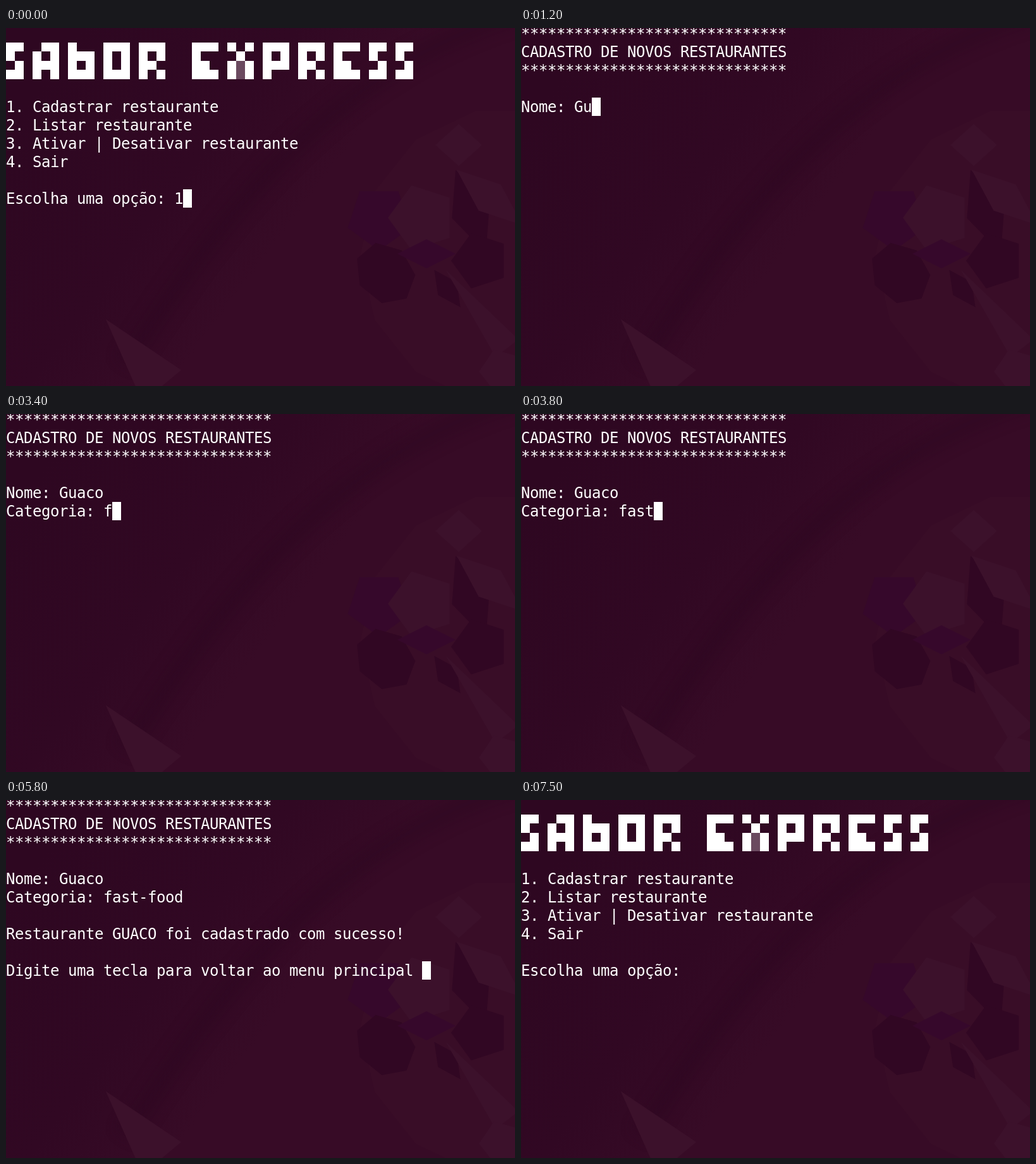
Recreate the animation shown at these times as an HTML page with a canvas. Size 805 by 566 pixels, loop 8000 ms.

```html
<!DOCTYPE html>
<html lang="pt">
<head>
<meta charset="utf-8">
<title>Terminal</title>
<style>
  html, body { margin: 0; width: 100%; height: 100%; overflow: hidden; background: #300822; }
  canvas { display: block; }
</style>
</head>
<body>
<canvas id="stage" width="805" height="566"></canvas>
<script>
const W = 805, H = 566, LOOP = 8000;
const CELL = 14, LINE = 29, TOP = -6, BASE = 23;
const FONT = '24px "DejaVu Sans Mono", monospace';
const LIGHT = '#3c112b', DARK = '#310723', VIOLET = '#36082b';
const ctx = document.getElementById('stage').getContext('2d');

const LOGO = [
  '█▀ ▄▀█ █▄▄ █▀█ █▀█   █▀▀ ▀▄▀ █▀█ █▀█ █▀▀ █▀ █▀',
  '▄█ █▀█ █▄█ █▄█ █▀▄   ██▄ █░█ █▀▀ █▀▄ ██▄ ▄█ ▄█'
];
const MENU = ['1. Cadastrar restaurante', '2. Listar restaurante',
  '3. Ativar | Desativar restaurante', '4. Sair'];

const NAME = 'Guaco', KIND = 'fast-food';
const NAME_KEYS = [900, 1200, 1300, 1400, 1600];
const KIND_KEYS = [3400, 3500, 3600, 3800, 4400, 4700, 4800, 5000, 5100];
const FORM_START = 200, KIND_START = 2300, DONE = 5800, FORM_END = 6900;

// Spans in which the blinking cursor is hidden
const BLINKS = [[2100, 2200], [2800, 3400], [5600, 5700], [6300, 6800], [7500, LOOP]];

function makeWallpaper() {
  const c = document.createElement('canvas');
  c.width = W;
  c.height = H;
  const g = c.getContext('2d');

  // Flattened regular polygon, first corner pointing along the tilt
  function facet(color, x, y, r, sides, tilt = 0, flat = 1) {
    g.save();
    g.translate(x, y);
    g.rotate(tilt * Math.PI / 180);
    g.scale(1, flat);
    g.beginPath();
    for (let i = 0; i < sides; i++) {
      const a = i / sides * 2 * Math.PI;
      g.lineTo(r * Math.cos(a), r * Math.sin(a));
    }
    g.restore();
    g.fillStyle = color;
    g.fill();
  }

  const fade = g.createLinearGradient(60, 80, 540, 440);
  fade.addColorStop(0, '#2e0721');
  fade.addColorStop(0.45, '#310823');
  fade.addColorStop(0.75, '#370b26');
  g.fillStyle = fade;
  g.fillRect(0, 0, W, H);

  // Faint dark sweep across the desktop
  g.filter = 'blur(10px)';
  g.strokeStyle = 'rgba(42,4,30,.28)';
  g.lineWidth = 36;
  g.beginPath();
  g.moveTo(190, 530);
  g.bezierCurveTo(330, 310, 510, 60, 830, -30);
  g.stroke();
  g.filter = 'none';

  facet(LIGHT, 217, 531, 92, 3, 230, 0.5);
  facet('#390d27', 795, 360, 235, 14);
  facet(VIOLET, 590, 300, 52, 5, 90);
  facet(LIGHT, 658, 300, 54, 5, 180);
  facet(DARK, 600, 388, 52, 7, 50, 0.85);
  facet(VIOLET, 665, 357, 46, 4, 0, 0.5);
  facet(LIGHT, 716, 185, 37, 4, 0, 0.9);
  facet(DARK, 735, 290, 70, 4, 70, 0.45);
  facet(LIGHT, 765, 268, 68, 4, 40, 0.4);
  facet(DARK, 750, 368, 46, 5, 180);
  facet(DARK, 698, 412, 36, 4, 55, 0.5);
  facet(LIGHT, 760, 465, 105, 3, 232, 0.25);
  facet(LIGHT, 784, 542, 36, 5, 250);
  return c;
}

const wallpaper = makeWallpaper();
const rowTop = row => TOP + row * LINE;

function write(text, row) {
  ctx.fillStyle = '#fff';
  [...text].forEach((ch, col) => ctx.fillText(ch, col * CELL, rowTop(row) + BASE));
}

function drawLogo() {
  const half = Math.floor(LINE / 2);
  LOGO.forEach((line, i) => {
    [...line].forEach((ch, col) => {
      if (ch === ' ') return;
      const y = rowTop(i + 1) + (ch === '▄' ? half : 0);
      const h = ch === '▀' ? half : ch === '▄' ? LINE - half : LINE;
      ctx.fillStyle = ch === '░' ? '#6b4a60' : '#fff';
      ctx.fillRect(col * CELL, y, CELL, h);
    });
  });
}

const typed = (text, keys, t) => text.slice(0, keys.filter(k => k <= t).length);

// Both screens return the cursor's column and row
function drawMenu(t) {
  drawLogo();
  MENU.forEach((item, i) => write(item, 4 + i));
  const prompt = 'Escolha uma opção: ' + (t < FORM_START ? '1' : '');
  write(prompt, 9);
  return [prompt.length, 9];
}

function drawForm(t) {
  const rule = '*'.repeat(30);
  write(rule, 0);
  write('CADASTRO DE NOVOS RESTAURANTES', 1);
  write(rule, 2);
  let text = 'Nome: ' + typed(NAME, NAME_KEYS, t), row = 4;
  write(text, row);
  if (t >= KIND_START) {
    text = 'Categoria: ' + typed(KIND, KIND_KEYS, t);
    row = 5;
    write(text, row);
  }
  if (t >= DONE) {
    write(`Restaurante ${NAME.toUpperCase()} foi cadastrado com sucesso!`, 7);
    text = 'Digite uma tecla para voltar ao menu principal ';
    row = 9;
    write(text, row);
  }
  return [text.length, row];
}

function frame(now) {
  const t = now % LOOP;
  ctx.drawImage(wallpaper, 0, 0);
  ctx.font = FONT;
  const inForm = t >= FORM_START && t < FORM_END;
  const [col, row] = inForm ? drawForm(t) : drawMenu(t);
  if (!BLINKS.some(([from, to]) => t >= from && t < to)) {
    ctx.fillStyle = '#fff';
    ctx.fillRect(col * CELL, rowTop(row), CELL, LINE);
  }
}

const start = performance.now();
function loop() {
  frame(performance.now() - start);
  requestAnimationFrame(loop);
}
loop();
</script>
</body>
</html>
```
